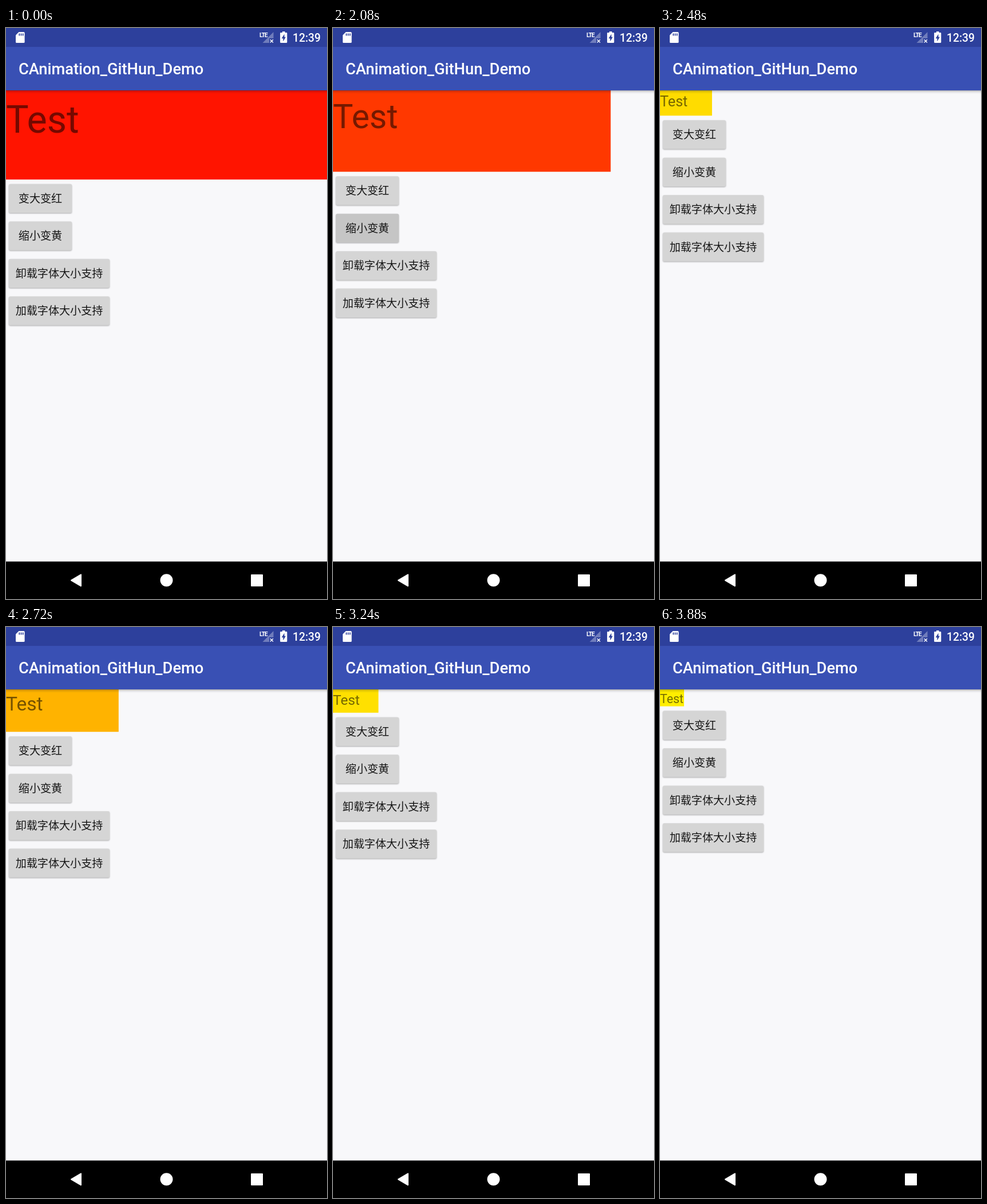
Animation, 561 px wide and 998 px high, one loop 3920 ms. Source, as an HTML page:

```html
<!DOCTYPE html>
<html lang="zh-CN">
<head>
<meta charset="utf-8">
<title>Resize and recolour with a bounce</title>
<style>
  html, body { margin: 0; width: 100%; height: 100%; overflow: hidden; background: #f8f8fa; }
  svg { display: block; width: 100vw; height: 100vh; }
  text { font-family: Roboto, "Noto Sans", sans-serif; }
  .button text { font: 19.1px "Noto Sans CJK SC", "Noto Sans CJK", sans-serif; text-anchor: middle; fill: #161616; }
  .plate { fill: #d5d5d5; filter: drop-shadow(0 1.2px 1.1px rgba(0, 0, 0, .32)); }
</style>
</head>
<body>
<svg viewBox="0 0 561 998">
  <defs>
    <linearGradient id="shade" x2="0" y2="1">
      <stop stop-opacity=".3"/>
      <stop offset=".4" stop-opacity=".1"/>
      <stop offset="1" stop-opacity="0"/>
    </linearGradient>
  </defs>
  <rect width="561" height="998" fill="#f8f8fa"/>
  <rect id="box" y="109"/>
  <text id="label" fill="#000" fill-opacity=".54">Test</text>
  <g id="buttons"></g>

  <rect y="109" width="561" height="6" fill="url(#shade)"/>
  <rect width="561" height="109" fill="#3950b4"/>
  <rect width="561" height="33" fill="#2d409c"/>
  <text x="22" y="81.3" font-size="27.27" font-weight="500" fill="#fff">CAnimation_GitHun_Demo</text>

  <g id="status" fill="#fff">
    <path d="M22.5 7H31q1.6 0 1.6 1.6V24.4Q32.6 26 31 26H18.600q-1.600 0-1.600-1.600V12.500Z"/>
    <path d="M23.300 9.500v4M26.500 9.500v4M29.700 9.500v4" stroke="#2d409c" stroke-width="1.700"/>
    <path d="M448.500 26 467.500 7V18H460V26Z" fill-opacity=".32"/>
    <path d="M461.700 20.300l5.200 5.200m0-5.200l-5.200 5.200" stroke="#fff" stroke-width="1.500"/>
    <text x="443" y="15.500" font-size="10.500" font-weight="700" letter-spacing="-1.200">LTE</text>
    <path d="M483 6h4.500v2H490q1.300 0 1.300 1.300V24.700Q491.300 26 490 26H480.400q-1.300 0-1.300-1.300V9.300Q479.100 8 480.400 8H483Z"/>
    <path d="M486.500 10.500 481.700 18.300H484.400V23.500L488.900 15.700H486.500Z" fill="#2d409c"/>
    <text x="550" y="24" font-size="19.3" font-weight="500" text-anchor="end">12:39</text>
  </g>

  <rect y="932.500" width="561" height="65.500"/>
  <g fill="#fff" stroke="#fff" stroke-width="2" stroke-linejoin="round">
    <path d="M114 965.300 131 955.300V975.300Z"/>
    <circle cx="280.500" cy="965.300" r="10"/>
    <rect x="429" y="956" width="19" height="19"/>
  </g>
</svg>
<script>
const LOOP = 3920, TICK = 40, DURATION = 2000;
const TOP = 109, PITCH = 65.45;
const SMALL = { width: 42, height: 29.6, font: 21.4, green: 238 };
const LARGE = { width: 561, height: 155.8, font: 66.5, green: 20 };
const captions = ['变大变红', '缩小变黄', '卸载字体大小支持', '加载字体大小支持'];

const byId = id => document.getElementById(id);
const box = byId('box'), label = byId('label'), buttons = byId('buttons');
const set = (node, values) => Object.entries(values).forEach(([k, v]) => node.setAttribute(k, v));
const clamp = x => Math.max(0, Math.min(1, x));
const ramp = (t, from, to) => clamp((t - from) / (to - from));
const mix = (key, k) => SMALL[key] + (LARGE[key] - SMALL[key]) * k;
const bend = (k, amount) => k * (1 + amount * (1 - k));

buttons.innerHTML = captions.map((caption, i) => {
  const width = caption.length > 4 ? 176 : 110;
  const rect = `x="5" width="${width}" height="50.3" rx="2.7"`;
  return `<g class="button" transform="translate(0 ${i * PITCH})">
    <rect class="plate" ${rect}/>
    ${i === 1 ? `<rect id="press" ${rect}/>` : ''}
    <text x="${5 + width / 2}" y="32.1">${caption}</text></g>`;
}).join('');
const press = byId('press');

function bounce(t) {
  const arc = (centre, base) => 8 * (t - centre) ** 2 + base;
  t *= 1.1226;
  if (t < 0.3535) return arc(0, 0);
  if (t < 0.7408) return arc(0.54719, 0.7);
  if (t < 0.9644) return arc(0.8526, 0.9);
  return arc(1.0435, 0.95);
}

// The motion stalls briefly, then catches up.
function elapsed(t) {
  if (t < 2320) return Math.min(t, 2200) - 1824;
  return t - 1877 + 36 * ramp(t, 2480, 2840);
}

function render(t) {
  const size = clamp(1 - bounce(clamp(elapsed(t) / DURATION)));
  const height = mix('height', bend(size, 0.42));
  const font = mix('font', size);
  set(box, {
    width: mix('width', bend(size, 0.14)),
    height,
    fill: `rgb(255 ${Math.round(mix('green', size))} 0)`
  });
  set(label, { 'font-size': font, y: TOP + font * 1.11 });
  set(buttons, { transform: `translate(0 ${TOP + height + 8})` });
  set(press, { 'fill-opacity': 0.075 * ramp(t, 1720, 1920) * (1 - ramp(t, 2120, 2400)) });
}

const start = performance.now();
function frame() {
  const t = (performance.now() - start) % LOOP;
  render(Math.floor(t / TICK) * TICK);
  requestAnimationFrame(frame);
}
frame();
</script>
</body>
</html>
```
